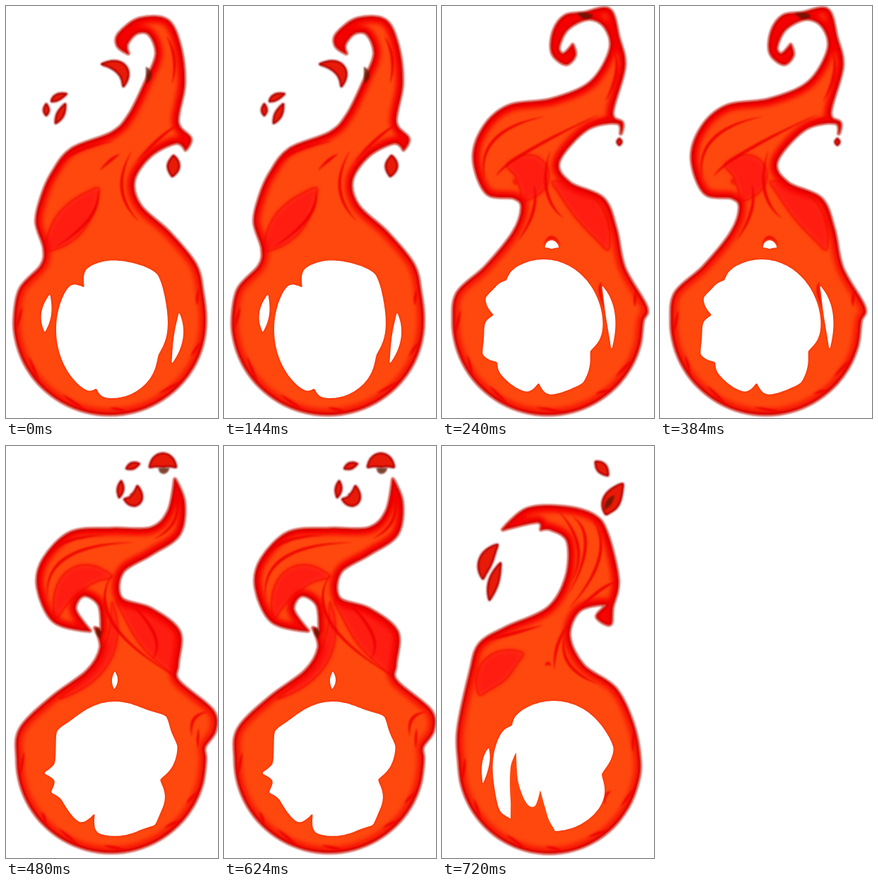
Animation, 300 px wide and 582 px high, one loop 920 ms. Source, as an HTML page:

```html
<!DOCTYPE html>
<html lang="en">
<head>
<meta charset="utf-8">
<title>Flame ring</title>
<style>
  html, body { margin: 0; width: 100%; height: 100%; overflow: hidden; background: #fff; }
  svg { display: block; width: 100%; height: 100%; }
</style>
</head>
<body>
<svg id="stage" viewBox="0 0 300 582" preserveAspectRatio="none">
  <defs>
    <filter id="soft" filterUnits="userSpaceOnUse" x="0" y="0" width="300" height="582"><feGaussianBlur stdDeviation="3"/></filter>
    <filter id="fine" filterUnits="userSpaceOnUse" x="0" y="0" width="300" height="582"><feGaussianBlur stdDeviation="1"/></filter>
    <linearGradient id="heat" gradientUnits="userSpaceOnUse" x1="0" y1="220" x2="0" y2="420">
      <stop offset="0" stop-color="#f50000"/>
      <stop offset="1" stop-color="#f50000" stop-opacity=".65"/>
    </linearGradient>
  </defs>
</svg>
<script>
const LOOP = 920;

// plume: key points from left shoulder over the tip to right shoulder ("!" = sharp corner).
// bowl, hole: ellipses [cx, cy, rx, ry]. dents: [degrees, depth, spread] cut into the hole.
// Everything else is a brush stroke: [width, "start middle end"].
const poses = [
  {
    start: 0, bowl: [147, 445, 135, 132], hole: [150, 457, 79, 97],
    plume: '20,400 50,367 54,342 43,305 51,268 66,235 93,202 150,179 175,153 199,104 213,68 203,40 185,38 171,54 173,67! 158,56 160,39 189,18 228,20 246,56 252,110 243,164 261,187 254,203! 241,193 205,211 181,246 190,282 231,320 268,365 278,405',
    dents: [[315, -.14, 20], [24, .09, 15], [108, .09, 5], [231, .2, 6]],
    fangs: [],
    slits: [[14, '62,408 57,435 55,460'], [13, '245,434 244,468 235,504']],
    bits: [[16, '135,82 163,89 166,114'], [9, '64,135 73,129 86,124'], [8, '57,138 57,147 57,155'],
           [10, '70,166 77,153 84,138'], [17, '237,211 237,226 235,241']],
    dark: [[8, '198,86 202,97 199,109']],
    tints: [[42, '57,346 92,305 131,257']],
    lines: ['161,209 148,218 133,232', '178,205 164,258 188,304', '74,224 104,204 152,191',
            '227,43 238,74 235,110', '243,168 216,188 185,220', '130,260 118,300 68,342']
  },
  {
    start: 240, bowl: [150, 445, 134, 132], hole: [144, 454, 84, 96],
    plume: '22,405 62,368 101,320 113,285 102,271 63,264 45,215 60,170 95,141 155,132 210,108 238,62 231,30 208,18 178,32 165,58 172,68 185,55! 188,70 175,82 156,66 158,36 174,14 200,10 237,5 250,45 258,86 241,151 255,165 253,180! 248,165 205,174 165,220 181,250 228,272 246,315 258,370 289,425',
    dents: [[24, .14, 12], [51, -.05, 10], [96, .17, 6], [147, .08, 5], [159, -.1, 9],
            [192, .14, 5], [204, -.07, 8], [228, .06, 6]],
    fangs: [],
    slits: [[13, '227,396 238,435 240,484'], [12, '146,341 155,337 165,341']],
    bits: [[7, '251,187 251,192 251,197']],
    dark: [[9, '192,10 203,14 214,13']],
    tints: [[52, '92,225 125,238 115,275'], [38, '156,248 205,288 235,345']],
    lines: ['60,244 75,188 145,156', '76,241 120,206 221,154', '153,204 148,260 172,300',
            '130,252 129,290 108,331', '244,65 246,98 231,134', '144,338 155,327 168,338',
            '226,390 224,404 231,430', '240,157 212,169 183,196']
  },
  {
    start: 480, bowl: [149, 443, 133, 131], hole: [154, 456, 84, 95],
    plume: '20,400 65,355 115,318 134,285 126,257! 135,262! 132,225 110,211 98,231 119,261! 68,248 45,200 53,160 92,122 150,117 205,116 230,92 239,47! 252,80 245,125 205,153 165,178 163,215 205,230 245,262 243,308 244,332 292,373 296,402 281,425',
    dents: [[318, -.15, 12], [342, -.1, 14], [12, .22, 12], [51, -.07, 8], [117, .24, 5],
            [162, -.12, 5], [177, -.18, 4], [210, -.12, 12]],
    fangs: [],
    slits: [[8, '154,319 154,331 153,343']],
    bits: [[20, '203,30 222,20 241,30'], [9, '170,32 179,28 189,25'], [9, '163,49 162,61 160,73'],
           [18, '167,75 183,75 186,56']],
    dark: [[9, '216,31 223,35 231,31'], [7, '128,256 131,263 133,272']],
    tints: [[34, '70,245 98,190 150,185'], [50, '157,218 210,265 240,325'], [16, '150,220 140,300 75,357']],
    lines: ['59,216 85,158 181,136', '151,180 151,250 241,326', '160,206 208,262 207,301',
            '66,150 92,133 140,126', '241,70 238,106 210,131', '285,376 266,386 263,410']
  },
  {
    start: 720, bowl: [152, 446, 128, 129], hole: [158, 452, 86, 92],
    plume: '23,400 40,320 53,280 90,257 150,229 176,185 178,135 155,118 140,118! 135,107 86,118! 120,89 170,86 215,98 234,125 249,190 241,228 238,252 219,241 232,224 195,232 180,268 200,310 245,342 270,392',
    dents: [[345, -.05, 12], [9, .2, 16], [141, -.12, 16], [222, .07, 6]],
    fangs: ['158,550 150,525 139,486! 132,508 120,505 108,475 105,433! 97,455 97,500 104,550'],
    slits: [[10, '66,427 62,448 58,476']],
    bits: [[14, '217,22 226,31 235,42'], [24, '232,97 240,77 256,53'], [19, '58,188 62,162 79,139'],
           [14, '67,218 73,192 83,165']],
    dark: [[8, '231,90 236,80 244,70']],
    tints: [[40, '53,352 76,315 115,293']],
    lines: ['184,99 203,140 180,208', '164,91 192,140 184,190', '214,104 222,160 180,229',
            '246,193 222,205 186,238', '181,250 164,280 159,316', '173,268 180,308 220,336',
            '60,275 96,266 143,253', '146,311 150,307 154,311', '240,487 231,495 231,506']
  }
];

const stage = document.getElementById('stage');

function add(parent, tag, attrs) {
  const el = document.createElementNS('http://www.w3.org/2000/svg', tag);
  for (const key in attrs) el.setAttribute(key, attrs[key]);
  parent.append(el);
  return el;
}

const parse = text => text.split(' ').map(s => {
  const [x, y] = s.replace('!', '').split(',').map(Number);
  return { x, y, sharp: s.endsWith('!') };
});

function closed(pts) {
  const n = pts.length;
  const at = i => pts[(i + n) % n];
  const tangent = i => at(i).sharp ? [0, 0]
    : [(at(i + 1).x - at(i - 1).x) / 6, (at(i + 1).y - at(i - 1).y) / 6];
  let d = `M${pts[0].x} ${pts[0].y}`;
  for (let i = 0; i < n; i++) {
    const a = at(i), b = at(i + 1), u = tangent(i), v = tangent(i + 1);
    d += `C${a.x + u[0]} ${a.y + u[1]} ${b.x - v[0]} ${b.y - v[1]} ${b.x} ${b.y}`;
  }
  return d + 'Z';
}

function onEllipse([cx, cy, rx, ry], deg, scale = 1) {
  const a = deg * Math.PI / 180;
  return { x: cx + rx * scale * Math.cos(a), y: cy + ry * scale * Math.sin(a) };
}

function arc(ellipse, from, to, step, scale = () => 1) {
  const pts = [];
  for (let deg = from; deg <= to; deg += step) pts.push(onEllipse(ellipse, deg, scale(deg)));
  return pts;
}

const bodyPath = pose => closed([...parse(pose.plume), ...arc(pose.bowl, 0, 180, 15)]);

const holePath = pose => closed(arc(pose.hole, 0, 357, 3, deg =>
  pose.dents.reduce((r, [at, depth, spread]) => {
    const gap = Math.abs((deg - at + 540) % 360 - 180);
    return r - depth * Math.exp(-((gap / spread) ** 1.5));
  }, 1)));

// Thick in the middle and pointed at both ends; sampled on a curve through the middle point.
function brush(width, [a, m, b]) {
  const N = 8, left = [], right = [];
  const q = { x: 2 * m.x - (a.x + b.x) / 2, y: 2 * m.y - (a.y + b.y) / 2 };
  for (let i = 0; i <= N; i++) {
    const t = i / N, s = 1 - t;
    const x = s * s * a.x + 2 * s * t * q.x + t * t * b.x;
    const y = s * s * a.y + 2 * s * t * q.y + t * t * b.y;
    const dx = s * (q.x - a.x) + t * (b.x - q.x), dy = s * (q.y - a.y) + t * (b.y - q.y);
    const w = width / 2 * Math.sin(Math.PI * t) ** .8 / (Math.hypot(dx, dy) || 1);
    left.push({ x: x - dy * w, y: y + dx * w });
    if (i && i < N) right.unshift({ x: x + dy * w, y: y - dx * w });
  }
  return closed([...left, ...right]);
}

const strokes = list => list.map(([width, text]) => brush(width, parse(text))).join('');

// Short licks of darker red that follow the rim of the bowl.
function licks(bowl, seed) {
  const random = () => (seed = seed * 16807 % 2147483647) / 2147483647;
  let d = '';
  for (let deg = -20; deg < 190; deg += 30) {
    const from = deg + random() * 15, span = 8 + random() * 10;
    d += brush(4, [onEllipse(bowl, from, .99), onEllipse(bowl, from + span / 2, .95), onEllipse(bowl, from + span, .93)]);
  }
  return d;
}

function rim(parent, d, color, width, filter, opacity = 1) {
  add(parent, 'path', {
    d, fill: 'none', stroke: color, 'stroke-width': width, 'stroke-linejoin': 'round',
    opacity, filter: `url(#${filter})`
  });
}

function draw(pose, index) {
  const root = add(stage, 'g', {});
  const body = bodyPath(pose);
  add(add(stage, 'clipPath', { id: 'clip' + index }), 'path', { d: body });

  rim(root, body, '#c00a00', 5.5, 'fine', .75);
  const inner = add(root, 'g', { 'clip-path': `url(#clip${index})` });
  add(inner, 'rect', { width: 300, height: 582, fill: '#ff480e' });

  const tints = strokes(pose.tints);
  add(inner, 'path', { d: tints, fill: '#ff0a14', opacity: .72, filter: 'url(#soft)' });
  rim(inner, tints, '#f00000', 2.5, 'fine', .55);
  rim(inner, body, 'url(#heat)', 17, 'soft');
  rim(inner, body, '#d40000', 5, 'fine', .85);

  const lines = strokes(pose.lines.map(text => [4.5, text])) + licks(pose.bowl, 77 + index);
  add(inner, 'path', { d: lines, fill: '#ee0600', opacity: .9, filter: 'url(#fine)' });

  const holes = holePath(pose) + strokes(pose.slits);
  rim(root, holes, '#f53808', 3, 'fine');
  add(root, 'path', { d: holes, fill: '#fff' });
  for (const f of pose.fangs) add(root, 'path', { d: closed(parse(f)), fill: '#ff480e' });

  const bits = strokes(pose.bits);
  add(root, 'path', { d: bits, fill: '#e81a08' });
  rim(root, bits, '#a80000', 3, 'fine', .85);
  add(root, 'path', { d: strokes(pose.dark), fill: '#5e1604', opacity: .8, filter: 'url(#fine)' });

  // Hard cut: shown only between this start and the next one.
  const end = index + 1 < poses.length ? poses[index + 1].start : LOOP;
  const key = (time, on) => ({ offset: time / LOOP, visibility: on ? 'visible' : 'hidden', easing: 'step-end' });
  return root.animate(
    [key(0, !pose.start), key(pose.start, true), key(end, end === LOOP), key(LOOP, end === LOOP)],
    { duration: LOOP, iterations: Infinity });
}

const runs = poses.map(draw);
const now = document.timeline.currentTime || 0;
runs.forEach(run => { run.startTime = now; });
</script>
</body>
</html>
```
